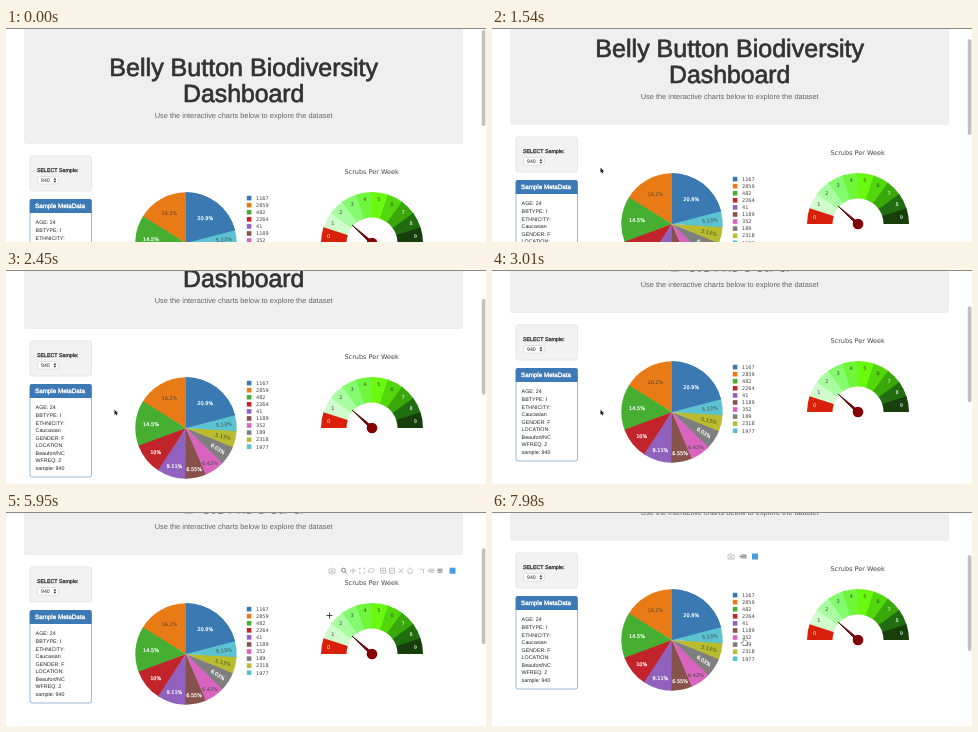
Write an HTML page with a canvas that moves like this. It is 480x214 px and loops after 8000 ms.

```html
<!DOCTYPE html>
<html lang="en">
<head>
<meta charset="utf-8">
<title>Biodiversity dashboard</title>
<style>
html, body { margin: 0; overflow: hidden; background: #fff; }
canvas { display: block; }
</style>
</head>
<body>
<canvas id="stage" width="480" height="214"></canvas>
<script>
const ctx = document.getElementById('stage').getContext('2d');
ctx.textRendering = 'geometricPrecision';
const SANS = '"Liberation Sans", sans-serif', WIDE = '"DejaVu Sans", sans-serif';
const TAU = Math.PI * 2;
const LOOP = 8000, STEP = 70;

const scrollKeys = [[0, 0], [1050, 0], [1540, 19], [1960, 39], [2450, 57], [2850, 73], [7500, 73], [7980, 87]];
const cursorKeys = [
  [490, 108.5, 139.8], [3400, 108.5, 139.8], [3710, 158, 121], [4100, 158, 121], [4270, 164, 117],
  [4410, 166, 117], [4900, 166, 117], [5200, 215, 112], [5670, 300, 105], [5950, 323, 103],
  [6600, 330, 100], [7000, 318, 108], [7420, 252, 127]
];

const pie = { x: 180, y: 215, r: 50.7 };
const slices = [
  ['1167', 163, '#3a79b1', '#fff', 'Anaerococcus'],
  ['2859', 126, '#e87b16', '#444', 'Peptoniphilus'],
  ['482', 113, '#46ae31', '#fff', ''],
  ['2264', 78, '#c2242b', '#fff', 'Finegoldia'],
  ['41', 71, '#9062bd', '#fff', ''],
  ['1189', 51, '#87524b', '#fff', ''],
  ['352', 50, '#d864c0', '#444', ''],
  ['189', 47, '#7f7f7f', '#fff', ''],
  ['2318', 40, '#b8bc2e', '#444', ''],
  ['1977', 40, '#5ac2d0', '#444', '']
].map(([id, value, color, ink, genus]) => ({ id, value, color, ink, genus }));
const total = slices.reduce((sum, s) => sum + s.value, 0);

// The largest slice runs clockwise from the top, the rest follow anticlockwise.
let edge = slices[0].value / total * TAU;
slices.forEach((s, i) => {
  const size = s.value / total * TAU;
  s.from = edge - size;
  s.to = edge;
  edge = i ? s.from : TAU;
  s.mid = (s.from + s.to) / 2;
  s.tilt = i > 6 ? s.mid - TAU / 4 : 0;
  const reach = i > 6 ? 38 : pie.r / (1 + Math.sin(size / 2));
  s.x = pie.x + reach * Math.sin(s.mid);
  s.y = pie.y - reach * Math.cos(s.mid);
  s.percent = +(s.value / total * 100).toPrecision(3) + '%';
});

const gauge = { x: 366, y: 215, r: 51, hole: 25.5 };
const gaugeColors = ['#d9200b', '#d0fbcc', '#a9fca0', '#84fa6f', '#6ff53a', '#6afa10', '#52d80a', '#3aa70b', '#216e10', '#163f0c'];

const icons = {
  camera: 'M-3-1.5h1.5l.7-1h1.6l.7 1h1.5v4h-6zM1 .5a1 1 0 1 1-2 0a1 1 0 1 1 2 0',
  zoom: 'M1.5-.5a2 2 0 1 1-4 0a2 2 0 1 1 4 0M1 1l2 2',
  pan: 'M-3 0h6M0-3v6',
  box: 'M-2.5-1v-1.5h1.5M1-2.5h1.5v1.5M2.5 1v1.5h-1.5M-1 2.5h-1.5v-1.5',
  lasso: 'M-2 2.5c-3-6 8-6 4.5-1.5q-2 1.5-4 0',
  zoomIn: 'M-2.5-2.5h5v5h-5zM-1.5 0h3M0-1.5v3',
  zoomOut: 'M-2.5-2.5h5v5h-5zM-1.5 0h3',
  fit: 'M-2.5-2.5l5 5M2.5-2.5l-5 5',
  home: 'M-3 0l3-3l3 3M-2 0v2.5h4v-2.5',
  spike: 'M-2.5-1.5h4v4',
  tag: 'M-3 0l1.5-1.5h4.5v3h-4.5zM-2 0h4',
  tags: 'M-2.5-1.5h5M-2.5 0h5M-2.5 1.5h5'
};
const arrow = new Path2D('M0 0v5l1.2-1.1l.8 1.7l.8-.4l-.7-1.6h1.6z');
const hand = new Path2D('M-.6-2.5h1.2v2.2l2.4.7v2l-.8 1.8h-3l-2-2.7l.6-.6l1.6 1z');

function at(keys, t) {
  const next = keys.findIndex(k => k[0] > t);
  if (next < 0) return keys[keys.length - 1].slice(1);
  if (!next) return keys[0].slice(1);
  const a = keys[next - 1], b = keys[next], p = (t - a[0]) / (b[0] - a[0]);
  return a.slice(1).map((v, i) => v + (b[i + 1] - v) * p);
}

function text(str, x, y, size, { font = SANS, color = '#333', align = 'left', bold = 0 } = {}) {
  ctx.font = `${size}px ${font}`;
  ctx.textAlign = align;
  ctx.fillStyle = ctx.strokeStyle = color;
  ctx.fillText(str, x, y);
  if (bold) {
    ctx.lineWidth = bold;
    ctx.lineJoin = 'round';
    ctx.strokeText(str, x, y);
  }
}

function box(x, y, w, h, radius, fill, stroke, line = 0.7) {
  ctx.beginPath();
  ctx.roundRect(x, y, w, h, radius);
  ctx.fillStyle = fill;
  ctx.fill();
  if (!stroke) return;
  ctx.strokeStyle = stroke;
  ctx.lineWidth = line;
  ctx.stroke();
}

function wedge({ x, y, r, hole = 0 }, from, to, color) {
  ctx.beginPath();
  ctx.arc(x, y, r, from - TAU / 4, to - TAU / 4);
  ctx.arc(x, y, hole, to - TAU / 4, from - TAU / 4, true);
  ctx.fillStyle = color;
  ctx.fill();
}

function drawHeader() {
  box(18, -10, 439, 126, 3, '#efefef');
  const title = { align: 'center', bold: 0.7, color: '#323232' };
  text('Belly Button Biodiversity', 237.7, 48, 25.05, title);
  text('Dashboard', 237.7, 74, 24.8, title);
  text('Use the interactive charts below to explore the dataset', 237.7, 90, 7.4, { align: 'center', color: '#666' });
}

function drawSidebar() {
  box(24, 128, 61.5, 35, 2, '#f2f2f2', '#e0e0e0');
  text('SELECT Sample:', 31, 143.7, 5.3, { bold: 0.3 });
  box(31.5, 148.5, 21, 7.5, 2, '#fff', '#c8c8c8', 0.5);
  text('940', 35, 154.2, 5.2, { color: '#222' });
  ctx.fillStyle = '#333';
  ctx.fill(new Path2D('M47.5 151.8l1.4-2l1.4 2zM47.5 152.8l1.4 2l1.4-2z'));

  box(24, 171.5, 61.5, 92.5, 2, '#fff', '#6f9bc5');
  box(23.7, 171, 62, 14, [2, 2, 0, 0], '#3d7ab5');
  text('Sample MetaData', 29, 180.2, 6.25, { color: '#fff', bold: 0.35 });
  ['AGE: 24', 'BBTYPE: I', 'ETHNICITY:', 'Caucasian', 'GENDER: F', 'LOCATION:', 'Beaufort/NC', 'WFREQ: 2', 'sample: 940']
    .forEach((row, i) => text(row, 29.6, 196.4 + i * 7.55, 5.3, { color: '#222' }));
}

function drawPie() {
  // Each slice runs a little under the next one, so no background shows between them.
  slices.forEach(s => wedge(pie, s.from - 0.02, s.to, s.color));
  wedge(pie, 0, slices[0].to, slices[0].color);
  slices.forEach((s, i) => {
    ctx.save();
    ctx.translate(s.x, s.y);
    ctx.rotate(s.tilt);
    text(s.percent, 0, 1.8, 5, { font: WIDE, color: s.ink, align: 'center', bold: s.ink === '#fff' ? 0.2 : 0 });
    ctx.restore();
    const y = 170 + i * 7.07;
    box(240.8, y - 2.2, 4.6, 4.6, 0, s.color);
    text(s.id, 250, y + 1.9, 5, { font: WIDE, color: '#444' });
  });
}

function drawGauge() {
  const { x, y } = gauge, part = TAU / 20;
  text('Scrubs Per Week', 365.6, 146, 6.5, { font: WIDE, color: '#444', align: 'center' });
  gaugeColors.forEach((color, i) => wedge(gauge, i * part - TAU / 4, Math.min(TAU / 4, (i + 1) * part - TAU / 4 + 0.02), color));
  gaugeColors.forEach((color, i) => {
    const mid = (i + 0.5) * part - TAU / 4;
    text(i, x + 44 * Math.sin(mid), y - 44 * Math.cos(mid) + 1.8, 5,
      { font: WIDE, align: 'center', color: i && i < 7 ? '#444' : '#fff' });
  });
  ctx.fillStyle = '#850000';
  ctx.strokeStyle = '#300';
  ctx.lineWidth = 0.7;
  ctx.beginPath();
  ctx.moveTo(x - 1, y + 1);
  ctx.lineTo(x + 1, y - 1);
  ctx.lineTo(x - 20, y - 18);
  ctx.closePath();
  ctx.fill();
  ctx.stroke();
  ctx.beginPath();
  ctx.arc(x, y, 5.3, 0, TAU);
  ctx.fill();
}

function drawToolbar(items, y, active, badgeX) {
  ctx.lineWidth = 0.9;
  for (const [name, x] of items) {
    ctx.save();
    ctx.translate(x, y);
    ctx.strokeStyle = name === active || name === 'tags' ? '#777' : '#bbb';
    ctx.stroke(new Path2D(icons[name]));
    ctx.restore();
  }
  box(badgeX - 3, y - 3, 6, 6, 0, '#4b9be0');
}

function drawHoverLabel(s) {
  const x = Math.max(177, s.x), y = s.y;
  box(x - 80, y - 13.5, 160, 27, 0, s.color, '#555', 0.6);
  const taxa = ['Bacteria', 'Firmicutes', 'Clostridia', 'Clostridiales', 'IncertaeSedisXI'];
  if (s.genus) taxa.push(s.genus);
  [s.id, taxa.join(';'), s.value, s.percent].forEach((line, i) =>
    text(line, x, y - 7.6 + i * 6.3, 4.55, { align: 'center', color: s.ink }));
}

function drawCursor(x, y, overPie) {
  ctx.save();
  ctx.translate(x, y);
  ctx.lineWidth = 0.8;
  if (x > 300) {
    ctx.strokeStyle = '#222';
    ctx.stroke(new Path2D('M-2.5 .5h6M.5-2.5v6'));
  } else {
    const pointing = overPie || (x > 238 && x < 266);
    if (pointing) ctx.translate(0, 2);
    const shape = pointing ? hand : arrow;
    ctx.strokeStyle = pointing ? '#222' : '#fff';
    ctx.fillStyle = pointing ? '#fff' : '#111';
    ctx.stroke(shape);
    ctx.fill(shape);
  }
  ctx.restore();
}

function draw(t) {
  const [scroll] = at(scrollKeys, t);
  const [x, y] = at(cursorKeys, t);
  const dx = x - pie.x, dy = y + scroll - pie.y;
  const angle = (Math.atan2(dx, -dy) + TAU) % TAU;
  const hovered = Math.hypot(dx, dy) < pie.r && slices.find(s => angle >= s.from && angle < s.to);

  ctx.fillStyle = '#fff';
  ctx.fillRect(0, 0, 480, 214);
  ctx.save();
  ctx.translate(0, -scroll);
  drawHeader();
  drawSidebar();
  drawPie();
  drawGauge();
  if (x > 112 && x < 290) drawToolbar([['camera', 239], ['tag', 251]], 131.5, 'tag', 263);
  if (x > 306) {
    drawToolbar([['camera', 326], ['zoom', 338], ['pan', 347], ['box', 356], ['lasso', 365], ['zoomIn', 377], ['zoomOut', 386],
      ['fit', 395], ['home', 404], ['spike', 416], ['tag', 425], ['tags', 434]], 131.7, 'zoom', 446.5);
  }
  if (hovered) drawHoverLabel(hovered);
  ctx.restore();

  box(475.8, 2 + scroll * 0.47, 3.6, 96, 1.8, '#c1c1c1');
  ctx.fillStyle = '#8a8a8a';
  ctx.fillRect(0, 0, 480, 1);
  if (t >= cursorKeys[0][0]) drawCursor(x, y, hovered);
}

function tick() {
  const t = performance.now() % LOOP;
  draw(Math.floor(t / STEP) * STEP);
  requestAnimationFrame(tick);
}
tick();
</script>
</body>
</html>
```
